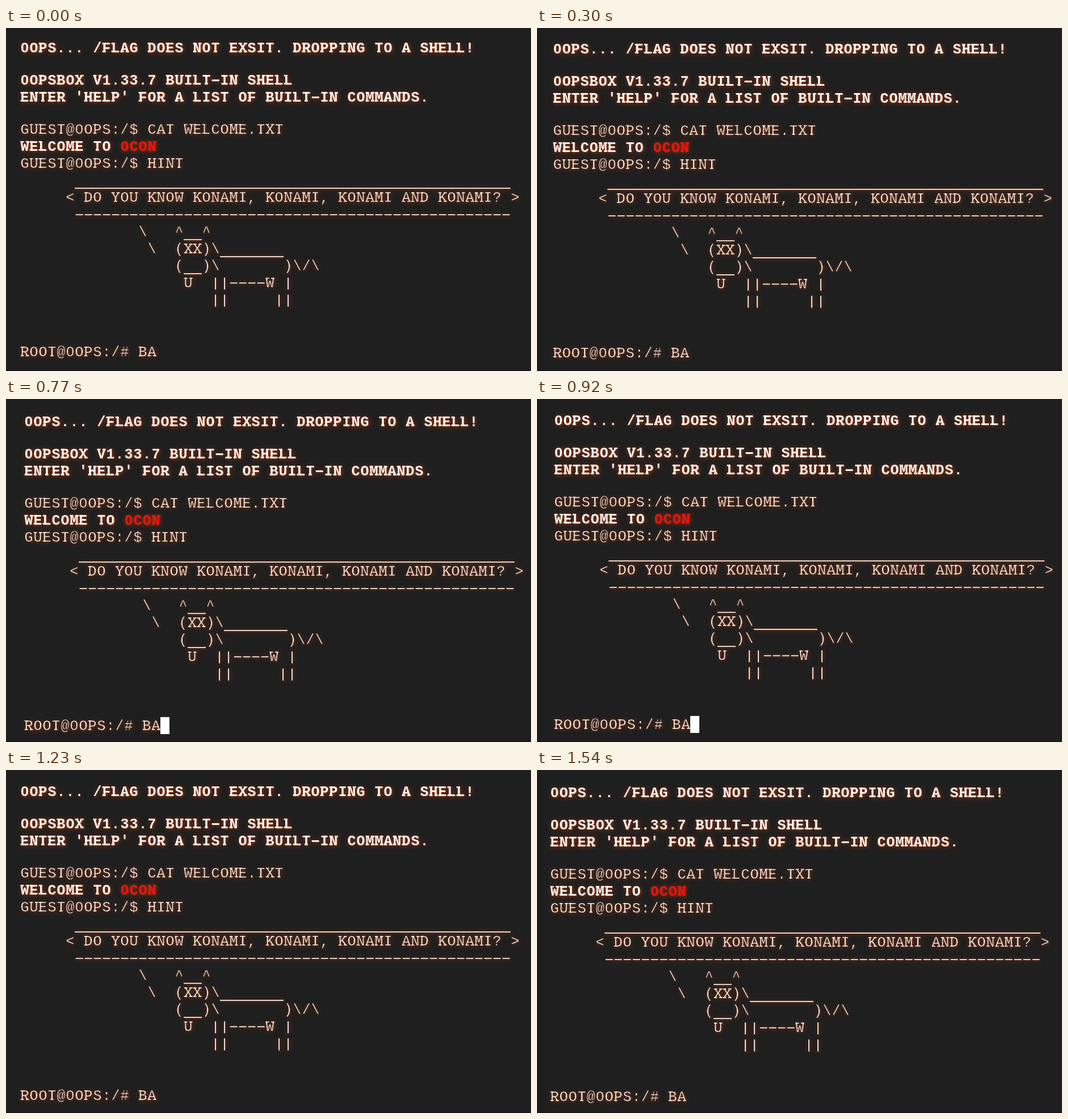
Recreate the animation shown at these times as an HTML page with a canvas. Size 925x606 px, loop 1.62 s.

```html
<!DOCTYPE html>
<html lang="en">
<head>
<meta charset="utf-8">
<title>Shell</title>
<style>
  html, body { margin: 0; height: 100%; overflow: hidden; background: #1f1f1f; }
  canvas { display: block; }
</style>
</head>
<body>
<canvas id="stage" width="925" height="606"></canvas>
<script>
const W = 925, H = 606, LOOP = 1620;
const LEFT = 25, CELL = 16, LINE = 30.2, SIZE = 25;
const BG = '#1f1f1f';

// Baseline of the first line in each block, bold flag, lines
const blocks = [
  [42.6, true, ['0OPS... /FLAG DOES NOT EXSIT. DROPPING TO A SHELL!']],
  [99.4, true, [
    '0OPSBOX V1.33.7 BUILT-IN SHELL',
    "ENTER 'HELP' FOR A LIST OF BUILT-IN COMMANDS."]],
  [186.2, false, ['GUEST@0OPS:/$ CAT WELCOME.TXT']],
  [216.4, true, ['WELCOME TO 0CON']],
  [246.6, false, [
    'GUEST@0OPS:/$ HINT',
    ' '.repeat(6) + '_'.repeat(48),
    '     < DO YOU KNOW KONAMI, KONAMI, KONAMI AND KONAMI? >',
    ' '.repeat(6) + '-'.repeat(48),
    '             \\   ^__^',
    '              \\  (XX)\\_______',
    '                 (__)\\       )\\/\\',
    '                  U  ||----W |',
    '                     ||     ||']],
  [579.4, false, ['ROOT@0OPS:/# BA']]
];

// Plain strokes inside a cell: x, y from baseline, width, height
const bars = {
  '_': [0, 5.7, 16, 1.3],
  '-': [1.8, -8.2, 12.6, 1.4],
  '|': [7.4, -17, 1.4, 21]
};

// Slab serifs: feet, then heads (l, c, r)
const slabs = {
  A: ['lr', ''], B: ['l', 'l'], D: ['l', 'l'], E: ['l', 'l'], F: ['l', 'l'],
  H: ['lr', 'lr'], K: ['lr', 'lr'], L: ['l', 'l'], M: ['lr', 'lr'],
  N: ['l', 'lr'], P: ['l', 'l'], R: ['lr', 'l'], T: ['c', ''], U: ['', 'lr'],
  V: ['', 'lr'], W: ['', 'lr'], X: ['lr', 'lr'], Y: ['c', 'lr']
};
const slabX = { l: 0.8, c: 5, r: 10 };

// Shake: start time, x, y
const shake = [
  [0, 0, 0], [70, 5, -2], [150, 4, 0], [300, 3, 2], [380, 2, -4],
  [460, -2, 10], [540, 3, 2], [690, 4, -2], [770, 7, 5], [830, 5, 10],
  [920, 5, 3], [1090, -2, 10], [1150, 2, -4], [1230, 0, 3], [1320, 7, 8],
  [1460, 3, 2], [1540, -2, 5]
];

const layer = document.createElement('canvas');
layer.width = W;
layer.height = H;
const ink = layer.getContext('2d');
ink.textAlign = 'center';
ink.lineJoin = 'round';

function glyph(ch, x, y, bold) {
  const bar = bars[ch];
  if (bar) {
    const [bx, by, bw, bh] = bar;
    ink.fillRect(x + bx, y + by, bw, bold ? bh + 1.2 : bh);
    return;
  }
  const mid = x + CELL / 2, thin = bold ? 0.5 : 0.8;
  ink.fillText(ch, mid, y + 0.3);
  ink.globalCompositeOperation = 'destination-out';
  ink.lineWidth = thin;
  ink.strokeText(ch, mid, y + 0.3);
  ink.globalCompositeOperation = 'source-over';
  if (ch === '0') ink.clearRect(mid - 1.8, y - 11, 3.6, 6);   // open counter

  const [feet, heads] = slabs[ch] || ['', ''];
  const thick = bold ? 2.2 : 1.2;
  const cap = ink.measureText('H').actualBoundingBoxAscent - thin / 2;
  for (const s of feet) ink.fillRect(x + slabX[s], y - thick, 5.5, thick);
  for (const s of heads) ink.fillRect(x + slabX[s], y + 0.3 - cap, 5.5, thick);
}

for (const [top, bold, lines] of blocks) {
  ink.font = `${bold ? 'bold ' : ''}${SIZE}px "Liberation Mono", monospace`;
  lines.forEach((line, row) => {
    const red = line.indexOf('0CON');
    [...line].forEach((ch, col) => {
      if (ch === ' ') return;
      ink.fillStyle = red >= 0 && col >= red ? '#f01010' : bold ? '#fff' : '#fff6ee';
      glyph(ch, LEFT + col * CELL, top + row * LINE, bold);
    });
  });
}

const ctx = document.getElementById('stage').getContext('2d');

function glow(x, y, color, blur) {
  ctx.shadowColor = color;
  ctx.shadowBlur = blur;
  ctx.shadowOffsetX = ctx.shadowOffsetY = 1;
  ctx.drawImage(layer, x, y);
  ctx.shadowColor = 'transparent';
}

let shown;
function draw(now) {
  const t = now % LOOP;
  const step = shake.findLast(s => s[0] <= t);
  if (step !== shown) {
    shown = step;
    const [start, x, y] = step;
    ctx.fillStyle = BG;
    ctx.fillRect(0, 0, W, H);
    ctx.fillStyle = '#18161b';
    ctx.fillRect(0, H - 2, W, 2);
    glow(x, y, 'rgba(255, 70, 0, 0.6)', 8);
    glow(x, y, 'rgba(255, 80, 0, 0.35)', 3);
    if (start >= 460 && start < 1090) {
      ctx.fillStyle = '#fff';
      ctx.fillRect(265 + x, 557 + y, CELL, 30);
    }
  }
  requestAnimationFrame(loop);
}

const begin = performance.now();
function loop() {
  draw(performance.now() - begin);
}
loop();
</script>
</body>
</html>
```
